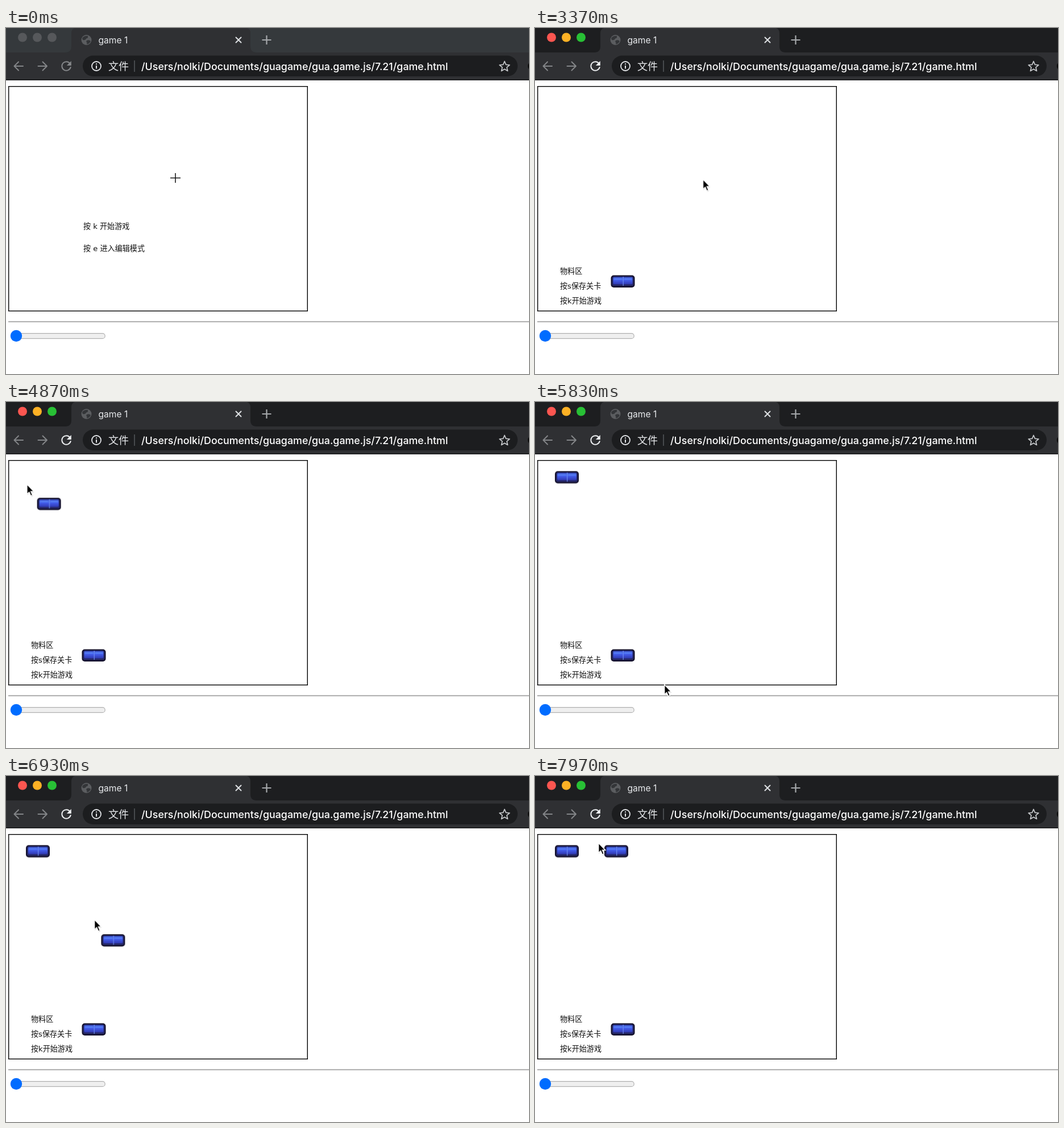
An HTML page for the animation above (8000 ms loop, 920 by 608 pixels).

```html
<!DOCTYPE html>
<html lang="zh-CN">
<head>
<meta charset="utf-8">
<title>game 1</title>
<style>
html, body { margin: 0; width: 100%; height: 100%; overflow: hidden; background: #fff; }
svg { display: block; width: 920px; height: 608px; }
.ui { font-family: Inter, 'Noto Sans CJK SC', 'Noto Sans CJK', sans-serif; fill: #e8eaed; }
.url { font-size: 17.85px; font-weight: 450; fill: #fff; }
.game { font: 500 13.1px 'DejaVu Sans', 'Noto Sans CJK SC', 'Noto Sans CJK', sans-serif; fill: #111; }
.line { fill: none; stroke-width: 2; stroke-linecap: round; stroke-linejoin: round; }
</style>
</head>
<body>
<svg viewBox="0 0 920 608">
  <defs>
    <linearGradient id="blue" x2="0" y2="1">
      <stop offset="0" stop-color="#3448b8"/>
      <stop offset=".28" stop-color="#4f74f4"/>
      <stop offset=".5" stop-color="#4159e6"/>
      <stop offset="1" stop-color="#3038b0"/>
    </linearGradient>
    <g id="pill">
      <rect width="42" height="21.5" rx="5" fill="#15122c"/>
      <rect x="2" y="2" width="38" height="17" rx="3.5" fill="#252768"/>
      <rect x="4" y="3" width="34" height="13" rx="2" fill="url(#blue)"/>
      <path d="M6 6.5H19M24 6.5H36" stroke="#5b84fa" stroke-width="1.6"/>
      <path d="M21.7 2.5V18.5" stroke="#6d8cf0" stroke-width="1.2"/>
    </g>
    <g id="reload">
      <path class="line" d="M112.6 62.5A7.8 7.8 0 1 0 113.7 69"/>
      <path d="M114.8 58V66H106.8Z" stroke="none"/>
    </g>
  </defs>

  <rect width="920" height="608" fill="#fff"/>
  <rect width="920" height="44" fill="#1d1e20"/>
  <circle cx="29" cy="16.5" r="8" fill="#fc5650"/>
  <circle cx="55" cy="16.5" r="8" fill="#fdb125"/>
  <circle cx="81" cy="16.5" r="8" fill="#28c035"/>
  <g class="idle">
    <rect width="920" height="44" fill="#35393c"/>
    <g fill="#56585b">
      <circle cx="29" cy="16.5" r="8"/><circle cx="55" cy="16.5" r="8"/><circle cx="81" cy="16.5" r="8"/>
    </g>
  </g>

  <rect y="43" width="920" height="48" fill="#2f3033"/>
  <path d="M104 43Q115 43 115 32V9Q115 2 121 0H424Q430 2 430 9V32Q430 43 441 43Z" fill="#2f3033"/>
  <rect y="90.5" width="920" height="1.5" fill="#1a1b1d"/>

  <circle cx="141.500" cy="21" r="9" fill="#5b5d60"/>
  <path d="M134 18Q138 13 144 14Q145 18 141 18.500Q140 22 135 21ZM142 22Q146 20 149 23Q147 28 142 28.500Q143 25 141 24Z" fill="#333538"/>
  <text class="ui" x="162.500" y="26.500" font-size="15.6">game 1</text>
  <path class="line" d="M404.500 16.500L413.500 25.500M413.500 16.500L404.500 25.500" stroke="#dfe1e4"/>
  <path d="M450.500 21H466.500M458.500 13V29" stroke="#a5a8ab" stroke-width="2.2"/>

  <g class="line" stroke="#838588">
    <path d="M30 67H15M22 59.500L14.500 67L22 74.500"/>
    <path d="M56.500 67H72M64.500 59.500L72 67L64.500 74.500"/>
  </g>
  <use href="#reload" fill="#eceef0" stroke="#eceef0" class="live"/>
  <use href="#reload" fill="#85878a" stroke="#85878a" class="idle"/>

  <rect x="135" y="48.500" width="765" height="36.500" rx="18.250" fill="#1c1d1f"/>
  <circle cx="159" cy="67" r="8" fill="none" stroke="#e2e4e7" stroke-width="1.8"/>
  <path d="M159 66V71.500M159 62.300V64.300" stroke="#e2e4e7" stroke-width="2"/>
  <text class="ui" x="180" y="73.500" font-size="18">文件</text>
  <path d="M226 57V77" stroke="#606367" stroke-width="1.3"/>
  <text class="ui url" x="238" y="73.500">/Users/nolki/Documents/guagame/gua.game.js/7.21/game.html</text>
  <path d="M877 58.500L879.500 64.400L885.900 65L881 69.200L882.500 75.500L877 72.200L871.500 75.500L873 69.200L868.100 65L874.500 64.400Z"
    fill="none" stroke="#c6c8cb" stroke-width="1.7" stroke-linejoin="round"/>
  <circle cx="927" cy="67" r="9" fill="#050505"/>

  <rect x="4.700" y="102.700" width="525.600" height="394.600" fill="none" stroke="#000" stroke-width="1.4"/>
  <path d="M4 516H920" stroke="#929292" stroke-width="1.4"/>
  <path d="M4 517.200H920" stroke="#e2e2e2"/>
  <rect x="8.500" y="536.700" width="165.700" height="9" rx="4.500" fill="#efefef" stroke="#b0b0b0" stroke-width="1.2"/>
  <circle cx="18" cy="541" r="10.200" fill="#006cff"/>

  <g id="menu" class="game">
    <text x="136" y="353">按 k 开始游戏</text>
    <text x="136" y="392">按 e 进入编辑模式</text>
  </g>
  <g id="editor" class="game">
    <text x="44" y="431.500">物料区</text>
    <text x="44" y="457.700">按s保存关卡</text>
    <text x="44" y="484">按k开始游戏</text>
    <use href="#pill" x="133.500" y="434.500"/>
  </g>
  <g id="first"><use href="#pill"/></g>
  <g id="second"><use href="#pill"/></g>

  <path id="cross" d="M289 263.500H307M298 255V272" stroke="#111" stroke-width="1.5"/>
  <g id="arrow">
    <g id="pointer">
      <path d="M1 2V19.500L5 16L8 22.500L11.500 21L8.600 14.800H13.600Z" fill="#000" opacity=".18"/>
      <path d="M.7 .8V18L4.600 14.500L7.500 21L10.400 19.700L7.500 13.300H12.800Z" fill="#000" stroke="#fff" stroke-width="1.4"/>
    </g>
  </g>
</svg>
<script>
const LOOP = 8000;
const run = (el, frames) =>
  el.animate(frames, { duration: LOOP, iterations: Infinity }).startTime = 0;

// Visible from a to b, with hard changes.
function show(sel, a, b = LOOP) {
  const frames = [[0, a === 0], [a, true], [b, false], [LOOP, b === LOOP]]
    .filter(([t], i) => i === 0 || i === 3 || (t > 0 && t < LOOP))
    .map(([t, on]) => ({ offset: t / LOOP, opacity: on ? 1 : 0, easing: 'step-end' }));
  document.querySelectorAll(sel).forEach(el => run(el, frames));
}

// Rows: time, x, y, easing towards the next row.
function move(sel, rows) {
  const last = rows[rows.length - 1];
  const all = [[0, rows[0][1], rows[0][2]], ...rows, [LOOP, last[1], last[2]]];
  run(document.querySelector(sel), all.map(([t, x, y, easing = 'linear']) =>
    ({ offset: t / LOOP, transform: `translate(${x}px, ${y}px)`, easing })));
}

show('.idle', 0, 530);
show('.live', 530);
show('#cross', 0, 300);
show('#arrow', 300);
show('#menu', 0, 3370);
show('#editor', 3370);
show('#first', 4230);
show('#second', 6370);

move('#pointer', [
  [3340, 298, 263],
  [3370, 295, 265],
  [3700, 228, 345],
  [4130, 157, 432, 'ease-out'],
  [4430, 157, 432, 'ease-in-out'],
  [5000, 22, 110],
  [5530, 22, 110, 'ease-in-out'],
  [5830, 227, 496, 'ease-in-out'],
  [6300, 156, 436],
  [6530, 156, 434, 'ease-in'],
  [6930, 155, 252],
  [7170, 131, 176, 'ease-out'],
  [7830, 111, 117]
]);
move('#first', [
  [4430, 170, 443.5, 'ease-in-out'],
  [5030, 35, 121.5]
]);
move('#second', [
  [6370, 168, 447],
  [6560, 168, 445, 'ease-in'],
  [6930, 167.5, 278.5],
  [7170, 142, 187, 'ease-out'],
  [7830, 122, 121.5]
]);
</script>
</body>
</html>
```
